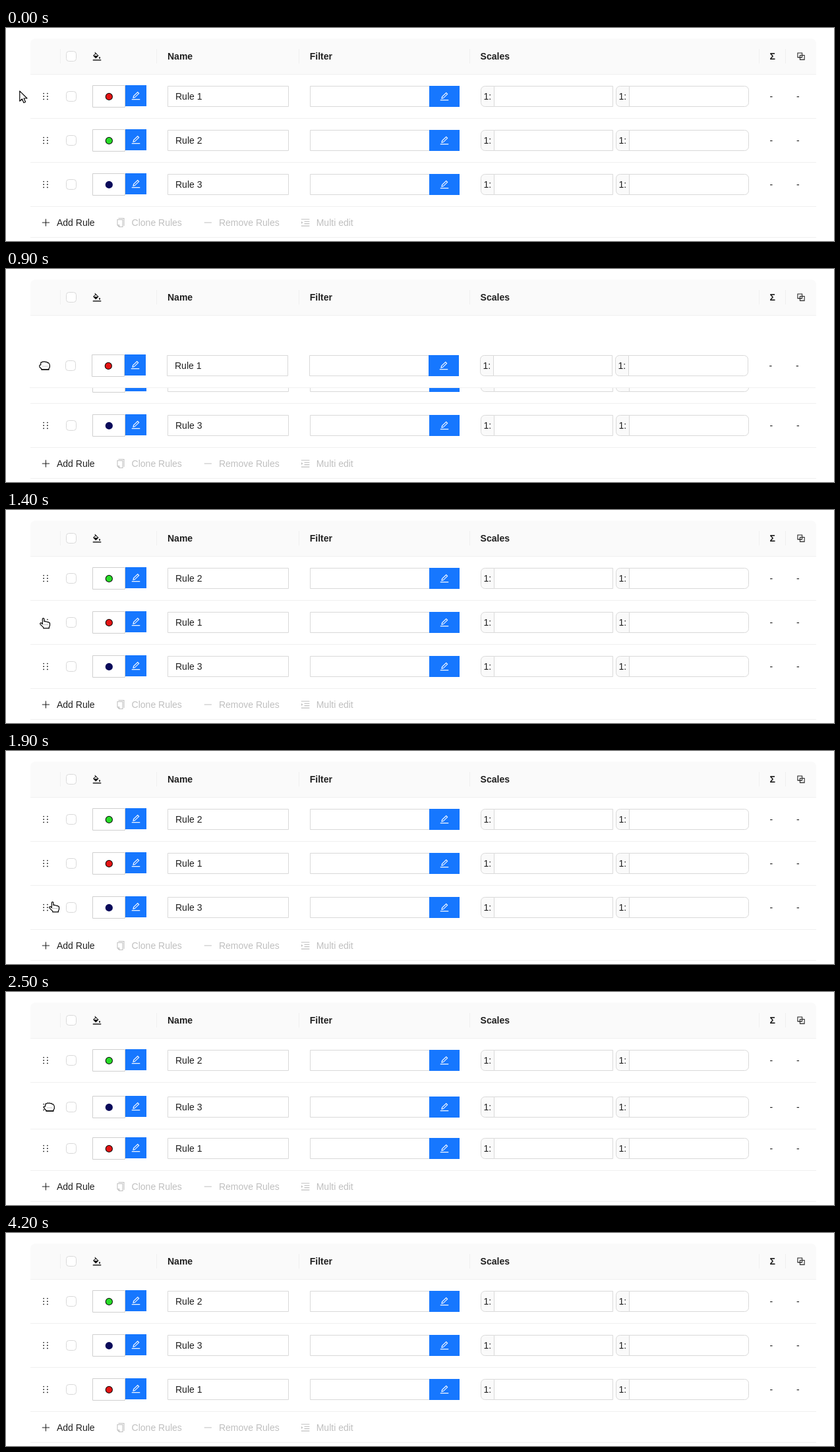
Recreate the animation shown at these times as an HTML page with a canvas. Size 1256 by 324 pixels, loop 5 s.

```html
<!DOCTYPE html>
<html lang="en">
<head>
<meta charset="utf-8">
<title>Sortable rules</title>
<style>
html, body { margin: 0; width: 100%; height: 100%; overflow: hidden; background: #fff; }
canvas { display: block; width: 1256px; height: 324px; }
</style>
</head>
<body>
<canvas id="stage" width="1256" height="324"></canvas>
<script>
const ctx = document.getElementById('stage').getContext('2d');
const LOOP = 5000, TICK = 100;
const INK = 'rgba(0,0,0,0.88)', FAINT = 'rgba(0,0,0,0.25)';
const LINE = '#f0f0f0', EDGE = '#d9d9d9', BLUE = '#1677ff';
const FONT = '"Liberation Sans", Arial, sans-serif';
const SLOTS = [104, 171, 238];
const DOTS = { 1: '#e31414', 2: '#28dc28', 3: '#0a0a5a' };

const linear = p => p;
const easeOut = p => 1 - (1 - p) ** 2;
const smooth = p => p * p * (3 - 2 * p);
const clamp = p => Math.min(1, Math.max(0, p));
const mix = (a, b, p) => a + (b - a) * p;

// Pointer path: start, end, shape, from x/y, to x/y, easing
const PATH = [
  [0, 300, 'arrow', 20, 95, 42, 92, smooth],
  [400, 500, 'point', 49, 95, 55, 98, linear],
  [800, 1100, 'grab', 49, 119, 50, 156, easeOut],
  [1200, 1300, 'point', 50, 159, 50, 159, linear],
  [1300, 1900, 'point', 50, 159, 65, 229, smooth],
  [2000, 2500, 'grab', 62, 231, 57, 168, smooth],
  [3100, 3200, 'point', 61, 171, 61, 171, linear],
  [3600, 3700, 'point', 62, 163, 62, 163, linear],
  [3800, 4200, 'arrow', 61, 130, 54, -24, linear]
];

// Each drag swaps two neighbouring rows
const DRAGS = [
  { id: 1, other: 2, from: 0, to: 1, start: 900, swap: 900, end: 1200, dx: -1 },
  { id: 3, other: 1, from: 2, to: 1, start: 2000, swap: 2300, end: 3100, dx: 0 }
];

function rect(x, y, w, h, color) {
  ctx.fillStyle = color;
  ctx.fillRect(x, y, w, h);
}

function box(x, y, w, h, radius = 0, fill = '#fff', edge = EDGE) {
  ctx.beginPath();
  ctx.roundRect(x + 0.5, y + 0.5, w - 1, h - 1, radius);
  ctx.fillStyle = fill;
  ctx.fill();
  ctx.strokeStyle = edge;
  ctx.lineWidth = 1;
  ctx.stroke();
}

function text(str, x, y, color = INK, weight = '') {
  ctx.font = `${weight} 14px ${FONT}`;
  ctx.fillStyle = color;
  ctx.fillText(str, x, y);
}

function disc(x, y, r, color) {
  ctx.beginPath();
  ctx.arc(x, y, r, 0, Math.PI * 2);
  ctx.fillStyle = color;
  ctx.fill();
}

function at(x, y, draw) {
  ctx.save();
  ctx.translate(x, y);
  draw();
  ctx.restore();
}

// Icons live in a 16 x 16 box
const ICONS = {
  edit: { line: 'M4 11.2L4.5 8.6L10.75 2.55L12.65 4.45L6.4 10.6Z', fill: 'M1.75 13.05H14.25V14.25H1.75Z' },
  block: { line: 'M2.9 2.9H9.6V9.6H2.9ZM6.4 6.4H13.1V13.1H6.4Z' },
  paint: {
    line: 'M6.3 3.3L9.9 6.9L6.3 10.5L2.7 6.9ZM6.5 3.5L4.7 1.7',
    fill: 'M2.7 6.7H10L6.3 10.5ZM12 8.2Q13.2 9.6 13.2 10.4A1.2 1.2 0 0 1 10.8 10.4Q10.8 9.6 12 8.2ZM1.75 12.75H14.25V14.2H1.75Z'
  },
  plus: { line: 'M2.4 8H13.6M8 2.4V13.6' },
  minus: { line: 'M2.4 8H13.6' },
  copy: { line: 'M4.5 1.5H13V13.1M3 3.5H11V14.5H5.6L3 11.9ZM3 11.7H5.8V14.5' },
  list: { line: 'M1.75 2.9H14.25M6.4 6.4H14.25M6.4 9.6H14.25M1.75 13.1H14.25', fill: 'M1.9 6L4.3 8L1.9 10Z' }
};
for (const icon of Object.values(ICONS))
  for (const part in icon) icon[part] = new Path2D(icon[part]);

function icon(name, x, y, color) {
  at(x, y, () => {
    const { line, fill } = ICONS[name];
    ctx.strokeStyle = ctx.fillStyle = color;
    ctx.lineWidth = 1.05;
    ctx.stroke(line);
    if (fill) ctx.fill(fill);
  });
}

const CURSORS = {
  arrow: ['M.8 .8V16.2L4.4 13L7 18.7L9.6 17.5L7.1 12H12Z'],
  point: [
    'M4.3 9.5V1.8Q4.4 .6 5.6 .6Q6.8 .6 6.9 1.8V5.6Q8.2 4.7 9.4 6Q10.8 5.3 12 6.6Q13.4 6.1 14.4 7.3Q15.5 7.2 15.5 8.8V11.5Q15.4 13 14.4 14V15.9H5.8V14.6L1 9.8Q.3 8.2 1.6 7.7Q2.7 7.5 4.3 9.5Z'
  ],
  grab: [
    'M2.7 5.9V3Q3.2 1.3 4.7 2Q5.8 .2 7.5 1.3Q9.1 .2 10.3 1.7Q12 1 13 2.6Q15 2.2 15.3 4.2Q16.4 4.6 16.3 6.4V9.5L15 11.4V13.2H3.8V11.7L1.2 9.5Q.2 7.2 1.2 6Z',
    'M4 12.9H15'
  ]
};
for (const key in CURSORS) CURSORS[key] = CURSORS[key].map(d => new Path2D(d));

function cursor(t) {
  const [t0, t1, kind, x0, y0, x1, y1, ease] = PATH.findLast(s => t >= s[0]);
  const p = ease(clamp((t - t0) / (t1 - t0)));
  return { kind, x: Math.round(mix(x0, x1, p)), y: Math.round(mix(y0, y1, p)) };
}

function drawCursor({ kind, x, y }) {
  at(x, y, () => {
    const [shape, extra] = CURSORS[kind];
    ctx.lineJoin = 'round';
    ctx.fillStyle = '#fff';
    ctx.fill(shape);
    ctx.strokeStyle = '#000';
    ctx.lineWidth = 1.2;
    ctx.stroke(shape);
    if (extra) ctx.stroke(extra);
    if (kind === 'arrow') return;
    const top = kind === 'grab' ? 7.5 : 10;
    for (let i = 0; i < 4; i++) rect(5.5 + i * 2.1, top, 0.9, 1, '#777');
  });
}

function header() {
  ctx.beginPath();
  ctx.roundRect(37, 16, 1192, 55, [8, 8, 0, 0]);
  ctx.fillStyle = '#fafafa';
  ctx.fill();
  rect(37, 70, 1192, 1, LINE);
  for (const x of [82, 228, 444, 703, 1142, 1182]) rect(x, 32, 1, 22, LINE);
  box(91, 35, 16, 16, 4);
  icon('paint', 130, 35.2, INK);
  text('Name', 245, 48, INK, 'bold');
  text('Filter', 460.7, 48, INK, 'bold');
  text('Scales', 719.6, 48, INK, 'bold');
  text('Σ', 1158.5, 48, INK, 'bold');
  icon('block', 1198, 35, INK);
}

function footer() {
  rect(37, 318, 1192, 1, LINE);
  const items = [['plus', 'Add Rule', 77], ['copy', 'Clone Rules', 190.6],
    ['minus', 'Remove Rules', 322.9], ['list', 'Multi edit', 470.7]];
  items.forEach(([name, label, x], i) => {
    const color = i ? FAINT : INK;
    icon(name, x - 24.6, 288, color);
    text(label, x, 301, color);
  });
}

function scale(x, end, right) {
  box(x, -16, 21, 32, [6, 0, 0, 6], '#fafafa');
  box(x + 20, -16, end - x - 20, 32, right);
  text('1:', x + 4.5, 5);
}

function row({ id, x, y }) {
  at(x, y, () => {
    rect(37, -33, 1192, 66, '#fff');
    rect(37, 33, 1192, 1, LINE);
    for (const dx of [57.1, 62.9])
      for (const dy of [-4.4, 0, 4.4]) disc(dx, dy, 0.9, INK);
    box(91, -8, 16, 16, 4);
    box(131, -17, 50, 34, 0, '#fff', '#cfcfcf');
    disc(156.3, 0.4, 5.6, id === 3 ? DOTS[3] : '#000');
    disc(156.3, 0.4, 4.6, DOTS[id]);
    rect(181, -17, 32, 32, BLUE);
    icon('edit', 189, -9, '#fff');
    box(245, -16, 184, 32);
    text('Rule ' + id, 257, 5);
    box(461, -16, 182, 32);
    rect(642, -16, 46, 32, BLUE);
    icon('edit', 657, -8, '#fff');
    scale(720, 921, 0);
    scale(925, 1127, [0, 6, 6, 0]);
    text('-', 1158.4, 5);
    text('-', 1199, 5);
  });
}

function rowsAt(t, pointer) {
  const pos = { 1: 0, 2: 1, 3: 2 };
  const rows = {};
  let held = null;
  for (const d of DRAGS) {
    if (t >= d.end) {
      pos[d.id] = d.to;
      pos[d.other] = d.from;
    } else if (t >= d.start) held = d;
  }
  for (const id of [1, 2, 3]) rows[id] = { id, x: 0, y: SLOTS[pos[id]] };
  if (held) {
    const p = easeOut(clamp((t - held.swap) / 200));
    rows[held.other].y = Math.round(mix(SLOTS[held.to], SLOTS[held.from], p));
    Object.assign(rows[held.id], { x: held.dx, y: pointer.y + 7 });
  }
  // the held row is painted last
  return Object.values(rows).sort((a, b) => held ? (a.id === held.id) - (b.id === held.id) : 0);
}

function draw(now) {
  const t = Math.floor((now % LOOP) / TICK) * TICK;
  const pointer = cursor(t);
  rect(0, 0, 1256, 324, '#fff');
  header();
  footer();
  rowsAt(t, pointer).forEach(row);
  drawCursor(pointer);
}

let begin = null;
function loop(now) {
  begin ??= now;
  draw(Math.max(0, now - begin));
  requestAnimationFrame(loop);
}
draw(0);
requestAnimationFrame(loop);
</script>
</body>
</html>
```
